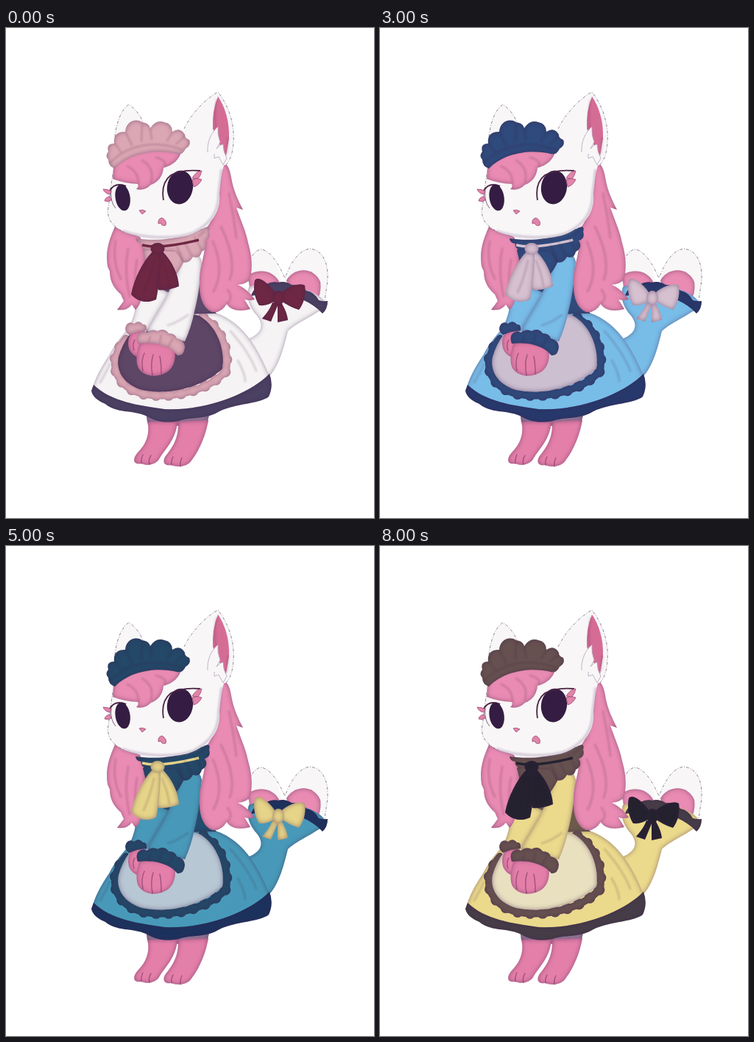
These frames come from a looping animation (500x666 px, 9000 ms). An HTML page:

```html
<!DOCTYPE html>
<html lang="en">
<head>
<meta charset="utf-8">
<title>Cat maid outfits</title>
<style>
html, body { margin: 0; width: 100%; height: 100%; overflow: hidden; background: #fff; }
svg { display: block; width: 100%; height: 100%; }
.soft > * { filter: url(#shade); }
.line { fill: none; stroke: #54244f; stroke-width: 1.5; stroke-linecap: round; opacity: .45; }
.fold { fill: none; stroke: #3a1738; stroke-width: 3; stroke-linecap: round; opacity: .15; filter: url(#blur); }
.edge { fill: none; stroke: #4b3d50; stroke-width: .8; stroke-dasharray: 4 2 1 2; opacity: .75; }
.fur { fill: #f8f6f7; }
.hair { fill: #e98bb2; }
.paw { fill: #e47fa9; }
.ruffle { fill: var(--ruffle); }
.bow { fill: var(--bow); }
.dress { fill: var(--dress); }
.hem { fill: var(--hem); }
.apron { fill: var(--apron); }
.vest { fill: var(--vest); }
.trim { fill: none; stroke: var(--ruffle); stroke-linecap: round; }
</style>
</head>
<body>
<svg viewBox="0 0 500 666">
<defs>
  <!-- darkens the inside edge of a shape -->
  <filter id="shade" x="-10%" y="-10%" width="120%" height="120%" color-interpolation-filters="sRGB">
    <feGaussianBlur in="SourceAlpha" stdDeviation="3" result="b"/>
    <feComposite in="SourceAlpha" in2="b" operator="out" result="edge"/>
    <feFlood flood-color="#3d1c48" flood-opacity=".5"/>
    <feComposite in2="edge" operator="in" result="tint"/>
    <feMerge><feMergeNode in="SourceGraphic"/><feMergeNode in="tint"/></feMerge>
  </filter>
  <filter id="blur" x="-50%" y="-50%" width="200%" height="200%"><feGaussianBlur stdDeviation="1.3"/></filter>
</defs>

<!-- tail -->
<path class="fur" d="M330 352C326 325 333 302 347 301C360 303 371 322 375 350Z"/>
<path class="fur" d="M378 350C385 325 395 302 413 300C433 302 440 325 436 350Q434 364 429 375L395 356Z"/>
<path class="edge" d="M330 345C326 325 333 302 347 301C360 303 371 322 379 340C385 325 395 302 413 300C433 302 440 325 436 350L433 370"/>
<g class="soft">
  <path class="hair" d="M329 336C345 326 365 330 372 347L332 362Z"/>
  <path class="hair" d="M381 343C391 326 417 323 427 345Q429 358 423 370L385 355Z"/>
  <path class="dress" d="M325 424C350 416 350 402 341 391C329 378 326 364 330 352C345 346 360 348 380 350C405 352 430 362 435 376C430 386 395 400 383 412C378 432 372 456 360 471L340 482Z"/>
  <path class="hem" d="M333 364C336 354 343 349 354 348Q362 344 370 346Q378 343 388 349Q401 349 408 357Q419 359 425 370Q431 372 437 371Q437 382 430 388C415 372 395 364 372 362C355 360 345 362 333 364Z"/>
</g>
<g class="soft">
  <path class="bow" d="M362 373C358 384 352 390 348 395L360 399L370 375Z"/>
  <path class="bow" d="M369 375L369 400L383 397C382 388 378 380 374 373Z"/>
  <path class="bow" d="M365 359C354 344 342 337 338 343C335 356 339 370 344 377C354 378 361 374 366 370Z"/>
  <path class="bow" d="M375 359C385 351 398 346 406 350C408 363 404 376 398 383C388 380 380 375 374 371Z"/>
  <ellipse class="bow" cx="370" cy="367" rx="8" ry="10"/>
</g>

<!-- legs -->
<g class="soft">
  <path fill="#8e6f91" d="M190 520H278L273 537Q232 545 192 536Z"/>
  <path class="paw" d="M192 535C197 555 187 569 179 577C171 586 173 594 184 592C192 596 204 593 208 586C216 572 231 560 233 535Z"/>
  <path class="paw" d="M234 535C235 556 227 569 219 579C211 588 214 596 224 594C234 598 247 596 252 588C265 571 272 550 275 533Z"/>
</g>
<path class="line" d="M184 592Q183 586 186 580M195 593Q193 587 197 581M225 594Q224 588 227 583M237 596Q236 590 239 584"/>

<!-- skirt and apron -->
<g class="soft">
  <path class="dress" d="M182 390C165 410 150 425 140 445C128 463 120 478 117 492C160 527 215 528 250 524C300 517 340 502 360 478C347 445 326 400 284 387Z"/>
  <path class="hem" d="M119 485C143 508 180 513 215 518C270 521 330 498 358 470Q364 486 357 501C345 511 312 510 290 521C270 533 252 528 235 534C215 538 202 534 190 527C172 519 150 524 135 511Q118 504 116 493Z"/>
</g>
<path class="fold" d="M305 412Q330 440 340 466M142 456Q132 475 128 482M315 452Q325 470 325 480"/>
<g class="soft">
  <g class="trim">
    <path stroke-width="10" d="M268 394C293 408 303 437 299 466C275 493 225 505 185 497C158 490 144 469 149 447Q154 432 163 422"/>
    <path stroke-width="15" stroke-dasharray="0 17" d="M268 394C293 408 303 437 299 466C275 493 225 505 185 497C158 490 144 469 149 447Q154 432 163 422"/>
  </g>
  <path class="apron" d="M185 400C215 388 245 386 262 391C286 404 298 436 294 463C268 488 222 500 185 492C160 485 149 466 153 447Q158 430 167 418Z"/>
</g>

<!-- torso, arms -->
<g class="soft">
  <path class="vest" d="M184 300L258 300C262 340 268 370 286 388Q230 388 186 396Z"/>
  <path class="dress" d="M177 366C177 382 173 394 168 405L190 414L222 360L200 350Z"/>
  <path class="dress" d="M238 312C250 302 264 304 266 318C264 345 261 366 256 385Q252 406 243 426L192 412C196 400 207 385 216 368Q232 340 238 312Z"/>
  <path class="paw" d="M171 413C163 424 164 441 178 447L193 432L188 411Z"/>
  <path class="ruffle" d="M167 417Q159 411 164 403Q168 398 174 402Q180 396 186 403Q192 402 191 411L178 413Z"/>
  <path class="paw" d="M181 429C191 425 220 427 229 437C232 452 226 466 214 470C203 475 190 473 183 466C176 460 176 445 181 429Z"/>
  <path class="ruffle" d="M179 429Q175 418 182 414Q186 411 191 414Q199 408 206 412Q215 407 221 415Q230 415 232 422Q242 424 243 433Q242 446 233 445L227 439C213 429 195 427 179 429Z"/>
</g>
<path class="line" d="M186 466Q183 452 188 442M199 472Q196 456 200 444M211 470Q211 456 209 446M174 438Q171 430 175 424"/>
<path class="fold" d="M247 390Q232 401 220 404M196 420L194 426M211 418L209 427M226 423L221 432"/>

<!-- long hair -->
<g class="soft">
  <path class="hair" d="M288 186C299 178 304 190 306 203C309 222 316 235 322 247L313 244C319 262 326 276 329 292C335 312 335 330 331 342Q326 348 315 349C326 354 333 362 338 369Q331 371 324 369L332 382C318 386 305 384 300 375Q292 388 280 386C268 381 262 366 263 346C262 320 276 300 268 276C285 262 290 230 288 186Z"/>
  <path class="hair" d="M148 270C139 290 135 305 138 324L141 331C141 346 148 355 156 362L160 371L151 383Q164 385 171 376L176 383C183 376 187 364 184 350C188 330 194 305 182 284Z"/>
</g>
<path class="fold" d="M303 225Q310 260 313 285M292 270Q314 315 304 342M281 290Q298 330 282 358M300 375Q310 367 301 356M149 290Q144 318 156 341M166 300Q160 330 168 365M178 315Q174 340 176 360"/>

<!-- collar and neck bow -->
<g class="soft">
  <path class="ruffle" d="M186 302C200 290 235 290 250 298Q240 325 230 336L194 334Z"/>
  <path class="ruffle" d="M176 286C195 289 225 289 246 280Q258 271 267 273Q279 266 276 277Q279 286 270 289Q276 299 266 304Q264 314 254 311Q249 321 239 318Q235 308 230 304L190 302Q182 298 184 293Q177 293 176 286Z"/>
</g>
<path d="M185 295Q210 301 262 288" fill="none" stroke="var(--bow)" stroke-width="3.5"/>
<path class="fold" d="M256 284L266 302M243 292L252 309M232 296L240 315M269 277L262 283"/>
<g class="soft">
  <path class="bow" d="M203 306C206 326 203 344 207 356Q222 357 235 351C234 334 226 318 213 304Z"/>
  <path class="bow" d="M198 305C186 318 174 340 170 362C178 372 192 375 204 369C208 350 210 326 210 306Z"/>
  <ellipse class="bow" cx="206" cy="300" rx="9.5" ry="8"/>
</g>
<path class="fold" d="M201 316Q196 340 187 359M212 316Q220 335 222 350"/>

<!-- head -->
<path class="fur" d="M148 148C150 128 157 110 167 104Q180 113 188 132L165 155Z"/>
<path class="edge" d="M148 148C150 128 157 110 167 104Q180 113 186 128"/>
<path class="fur" d="M148 185C143 200 142 225 139 243C136 260 145 270 160 277C185 287 230 290 255 279C280 267 292 250 290 225C292 205 293 195 297 184C290 150 200 135 165 160Z"/>
<path fill="none" stroke="#9e86a5" stroke-width="4" opacity=".35" filter="url(#blur)" d="M158 276C185 286 230 288 255 278C278 266 289 250 289 225L293 192"/>
<path class="edge" d="M147 190C143 205 142 225 139 243C136 260 145 270 160 277"/>
<path class="fur" d="M242 140C250 120 268 98 288 87C302 105 311 130 309 155Q308 176 299 186C280 190 255 180 240 160"/>
<path class="edge" d="M242 137C250 120 268 98 288 87C302 105 311 130 309 155Q308 176 299 186"/>
<path fill="#d56c95" d="M288 93C297 106 304 126 303 150L299 174C292 165 287 150 281 137Q280 112 288 93Z"/>
<path class="fold" d="M286 98Q282 115 285 136M302 150L300 170"/>
<path class="fur" stroke="#b5a2ba" stroke-width=".8" d="M274 169C273 154 279 142 288 134Q287 145 291 155L286 164Q291 158 295 158Q295 168 300 177L295 186L289 175L283 177L283 171"/>

<!-- face -->
<path d="M141 221Q148 209 163 215" fill="none" stroke="#4b2444" stroke-width="2"/>
<path d="M143 219Q141 236 149 245" fill="none" stroke="#826783" stroke-width="1"/>
<ellipse fill="#351c42" cx="158.5" cy="230.5" rx="10" ry="18" transform="rotate(-9 158 230)"/>
<ellipse fill="#351c42" cx="236.5" cy="216.5" rx="17.5" ry="23" transform="rotate(8 236 216)"/>
<path d="M214 234Q210 211 224 200Q237 192 264 194" fill="none" stroke="#4b2444" stroke-width="1.8"/>
<g fill="#e185aa" stroke="#9c4773" stroke-width=".8">
  <path d="M253 204Q258 195 266 194Q265 200 261 205Z"/>
  <path d="M253 206Q260 203 266 206Q262 214 255 216Z"/>
  <path d="M141 226Q134 225 132 219Q139 219 143 222Z"/>
  <path d="M141 229Q135 230 134 235Q139 237 143 234Z"/>
  <path d="M181 248Q185 246 190 249L185 253Z"/>
  <path d="M207 266Q206 259 212 258Q219 262 217 268Q212 270 210 265Z"/>
</g>

<!-- fringe and headdress -->
<g class="soft">
  <path class="hair" d="M146 188C158 168 195 158 238 168C236 178 227 187 214 190C213 202 206 210 197 213Q188 222 177 219Q181 216 179 212Q160 211 145 205Z"/>
  <path class="ruffle" d="M148 191Q139 188 139 179Q134 174 139 168Q136 157 147 157Q145 141 162 141C163 127 176 122 185 128Q194 129 196 136Q204 124 215 128Q226 130 226 141Q237 134 243 145Q242 149 249 152Q252 160 244 164Q240 173 232 171C204 164 168 170 148 191Z"/>
</g>
<path class="fold" d="M142 183C165 158 205 152 238 165M148 157L157 170M163 143L171 159M185 131L184 153M196 137L198 151M226 142L219 153M243 147L232 157"/>
<path class="fold" d="M165 188Q180 195 180 211M185 180Q202 190 197 209M204 176Q219 180 216 188"/>
</svg>
<script>
const parts = ["ruffle", "bow", "dress", "hem", "apron", "vest"];
const outfits = [
  "#dba7b4 #6f2843 #f5f3f4 #4a4163 #5d4666 #5d4a6b",
  "#dba7b4 #6f2843 #a37a98 #453050 #d9cdd6 #6b4a70",
  "#dfabb8 #71344a #43264f #21143b #9f7b95 #38204a",
  "#2f4a7c #d6c1d0 #78bce8 #27396c #cbbfd0 #2f4b7b",
  "#2a4875 #dccaac #60acd0 #223462 #bfc3d2 #2a4a75",
  "#244868 #e6d489 #4899b9 #1c325e #b7c7d4 #234c6d",
  "#ecd988 #e4e2e8 #25224f #dac07c #3c3654 #25224f",
  "#a48d64 #7d7b86 #877a69 #857556 #918987 #463b4c",
  "#665150 #24222f #ebd98c #463d48 #e9e0c0 #6c5b4b"
].map(s => s.split(" "));

let shown = -1;
function tick() {
  const i = Math.floor(performance.now() / 1000) % outfits.length;
  if (i !== shown) {
    shown = i;
    parts.forEach((p, k) => document.body.style.setProperty("--" + p, outfits[i][k]));
  }
  requestAnimationFrame(tick);
}
tick();
</script>
</body>
</html>
```
